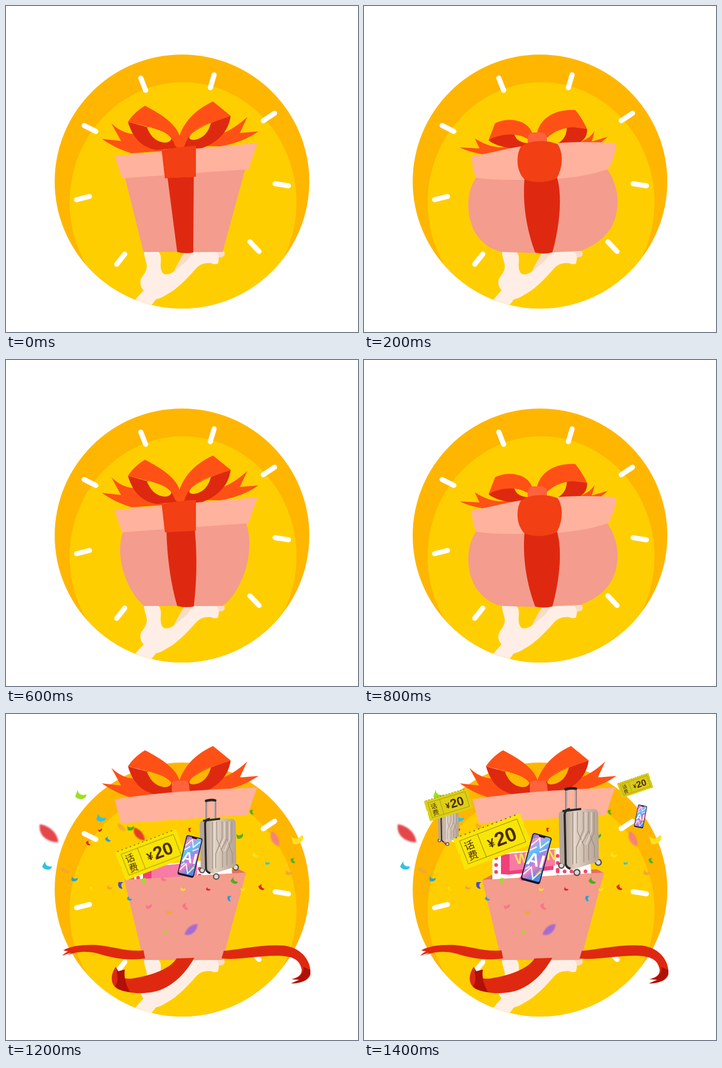
Recreate the animation shown at these times as an HTML page. Size 658 px wide and 611 px high, loop 1600 ms.

```html
<!DOCTYPE html>
<html lang="zh">
<head>
<meta charset="utf-8">
<title>Gift box</title>
<style>
  html, body { margin: 0; width: 100%; height: 100%; overflow: hidden; background: #fff; }
  svg { display: block; width: 100%; height: 100%; }
  .scene { opacity: 0; }
  .orange { fill: #ff5116; }
  .dark { fill: #de2910; }
  .knot { fill: #ff623c; }
  .band { fill: #f23f14; }
  .deep { fill: #b01008; }
  .lid { fill: #ffb29e; }
  .body { fill: #f49c8d; }
  .inside { fill: #e2705c; }
  .cjk { font-family: "Noto Sans CJK SC", "Noto Sans CJK", sans-serif; }
  .num { font-family: "Liberation Sans", Arial, sans-serif; font-weight: bold; }
  text { text-anchor: middle; }
</style>
</head>
<body>
<svg viewBox="0 0 658 611">
  <defs>
    <clipPath id="disc"><circle cx="329" cy="329" r="238"/></clipPath>
    <filter id="soft" x="-40%" y="-40%" width="180%" height="180%"><feGaussianBlur stdDeviation=".6"/></filter>
    <linearGradient id="shell">
      <stop offset="0" stop-color="#b8a696"/><stop offset=".3" stop-color="#e0d2c5"/>
      <stop offset=".65" stop-color="#c9b8a9"/><stop offset="1" stop-color="#b5a496"/>
    </linearGradient>
    <linearGradient id="screen" x2=".5" y2="1">
      <stop offset="0" stop-color="#7a6be0"/><stop offset=".22" stop-color="#e58fdc"/>
      <stop offset=".42" stop-color="#58c4f5"/><stop offset=".6" stop-color="#8f8cf0"/>
      <stop offset=".78" stop-color="#f07cc0"/><stop offset="1" stop-color="#4f8ce8"/>
    </linearGradient>

    <g id="loops">
      <path class="orange" d="M179 249L215 253L197 220C214 236 229 240 243 240L300 262L291 272L235 276C214 270 195 260 179 249Z"/>
      <path class="orange" d="M472 235L437 238L451 208C436 222 421 232 406 238L345 262L400 263C431 258 453 248 472 235Z"/>
      <path class="dark" fill-rule="evenodd" d="M228 217C236 245 252 265 282 270L322 266C317 245 290 228 264 227ZM263 226C269 243 280 255 297 256C305 256 310 251 309 247C302 238 287 231 263 226Z"/>
      <path class="orange" d="M260 187C290 203 322 222 326 250L324 268L316 262C311 244 296 231 264 226L228 217C236 205 247 194 260 187Z"/>
      <path class="dark" fill-rule="evenodd" d="M420 206C416 235 396 257 362 268L326 267C338 240 360 225 420 206ZM383 219C378 240 365 250 350 251C343 251 341 247 344 243C352 232 365 226 383 219Z"/>
      <path class="orange" d="M387 179L420 206L382 219C355 228 341 240 333 264L319 268C323 225 350 196 387 179Z"/>
    </g>
    <g id="top">
      <use href="#loops"/>
      <path class="knot" d="M310 250Q311 244 318 244H334Q341 244 342 250L344 270H310Z"/>
      <path class="lid" d="M203 279C270 268 350 261 469 257L452 308L215 324Z"/>
    </g>
    <g id="wrap">
      <use href="#loops"/>
      <path class="lid" d="M203 281L470 257L453 306L217 323Z"/>
      <path class="band" d="M291 270Q322 264 355 262V320L297 323Z"/>
    </g>

    <path id="chip" d="M-6 -5C-4 0 1 1 6 -3C9 3 -1 8 -6 4Z"/>
    <path id="flake" d="M-7 -4C-1 -5 5 -2 7 3C1 5 -6 3 -7 -4Z"/>

    <g id="ticket">
      <path fill="currentColor" d="M-67 -31H67V-9Q63 -5 67 0V31H-67V7Q-63 3 -67 -1Z"/>
      <path fill="none" stroke="#8a7600" stroke-width="2" stroke-dasharray="3 6" d="M-62 -31H62"/>
      <path fill="none" stroke="#8c7600" stroke-width=".9" d="M-57 -23H58V23H-57ZM-21 -23V23"/>
      <g fill="#4b2c0a">
        <text class="cjk" x="-43" y="-2" font-size="19" font-weight="500">话</text>
        <text class="cjk" x="-43" y="18" font-size="19" font-weight="500">费</text>
        <text class="num" x="-3" y="10" font-size="23">¥</text>
        <text class="num" x="26" y="13" font-size="37">20</text>
      </g>
    </g>

    <g id="phone">
      <rect x="-15.5" y="-38" width="31" height="76" rx="3.5" fill="#15152c"/>
      <rect x="-14" y="-36.5" width="28" height="71" rx="2.5" fill="url(#screen)"/>
      <path fill="none" stroke="#fff" stroke-width="2.2" opacity=".85" d="M-13 -18L-3 -32L2 -18L12 -31M-13 29L-4 15L3 32L12 18M-13 -10L-4 -18M2 -11L12 -18M-12 20L-7 14"/>
      <path fill="none" stroke="#ffb03c" stroke-width="2" d="M-12 -27L-7 -31M6 25L12 14"/>
      <path fill="#15152c" d="M-6 -37H6L4 -34H-4Z"/>
      <text class="num" y="12" font-size="28" fill="#fff">AI</text>
    </g>

    <g id="bag">
      <path fill="none" stroke="#b5b0ac" stroke-width="3" d="M379 142V182M395 142V180"/>
      <path fill="none" stroke="#444" stroke-width="1" d="M377 142V182M397 142V180"/>
      <path fill="none" stroke="#26262a" stroke-width="5" stroke-linecap="round" d="M377 141Q387 138 396 140"/>
      <g fill="#dcd8d5" stroke="#55504d" stroke-width="2.5">
        <circle cx="369" cy="284" r="5"/><circle cx="398" cy="297" r="5.5"/><circle cx="438" cy="278" r="5.5"/>
      </g>
      <path fill="#b5a598" d="M364 190Q364 182 371 181L384 178L383 287L366 278Z"/>
      <path fill="url(#shell)" d="M377 185Q378 178 386 177L430 178Q438 179 438 188L439 269Q439 275 433 278L392 291Q380 291 379 282Z"/>
      <path fill="none" stroke="#27272a" stroke-width="4" d="M385 178Q376 179 375 188L377 282Q379 288 386 290"/>
      <path fill="none" stroke="#a08f81" stroke-width="1.5" d="M390 184V282M399 183V220L411 247V278M410 183V218L397 250V280M420 183V219L409 240M430 184V222L420 246V274M420 219L431 249V270"/>
      <path fill="none" stroke="#f1e8de" stroke-width="1.2" d="M394 184V281M415 184V218L403 246M425 184V220L415 245"/>
      <path fill="#29292c" d="M371 180L406 176V180L371 184Z"/>
    </g>

    <g id="card">
      <path fill="#fff" d="M240 262L420 246L426 310H240Z"/>
      <path fill="none" stroke="#f0466e" stroke-width="7" stroke-linecap="round" stroke-dasharray="0 13" d="M247 270V306M362 266V306M362 295H420"/>
      <path fill="#f0407a" d="M256 264L354 254V292L270 301L256 300Z"/>
      <path fill="#f77ba5" d="M272 262L357 254V284L272 294Z"/>
    </g>
  </defs>

  <g clip-path="url(#disc)">
    <rect width="658" height="611" fill="#ffb600"/>
    <ellipse cx="331" cy="368" rx="212" ry="225" fill="#ffce00"/>
  </g>
  <path fill="none" stroke="#fff" stroke-width="9.5" stroke-linecap="round" d="M252 135L261 158M389 129L382 153M146 224L168 235M481 215L502 201M503 333L528 337M132 363L156 357M207 484L222 465M456 442L473 460"/>
  <g clip-path="url(#disc)">
    <path fill="#f8dcc8" d="M313 500C318 487 326 474 334 461L407 459C411 465 408 471 401 471L370 478Z"/>
    <path fill="#ffeee6" d="M258 461L284 460C292 466 289 478 289 487C290 499 293 503 300 503C313 502 322 490 333 482C342 475 344 468 350 462L393 461C400 466 398 477 396 483C390 485 387 483 383 482C372 481 363 484 356 491C340 509 320 531 300 541C291 547 284 549 280 550L268 566L230 565L242 550L257 533C249 524 250 513 255 507C260 500 264 494 263 485C262 478 258 470 258 461Z"/>
  </g>

  <g class="scene" data-steps="02">
    <path class="body" d="M222 320L257 461H405L447 306Z"/>
    <path class="dark" d="M302 322L351 320L350 462Q335 465 320 461Z"/>
    <use href="#wrap"/>
  </g>

  <g class="scene" data-steps="3">
    <path class="body" d="M220 320C202 360 222 430 258 461H405C445 430 466 355 449 306Z"/>
    <path class="dark" d="M300 321L353 319C358 370 356 420 351 462Q335 465 320 461C308 420 301 370 300 321Z"/>
    <use href="#wrap"/>
  </g>

  <g class="scene" data-steps="14">
    <path class="orange" d="M179 265L216 267L207 248C222 258 237 263 252 265L292 262L285 270L222 278C206 275 191 271 179 265Z"/>
    <path class="orange" d="M456 245L426 254L431 234C425 244 417 249 410 252L390 262H436Z"/>
    <path class="dark" d="M233 252C243 238 272 236 281 241C284 251 294 257 308 257L290 267C268 267 246 262 233 252Z"/>
    <path class="orange" d="M233 251L245 220C264 209 306 210 315 240L307 250C292 239 262 236 233 251Z"/>
    <path class="dark" d="M417 230C418 247 408 257 388 260H356C371 255 380 243 379 225Z"/>
    <path class="orange" d="M323 240C328 214 352 193 395 195C404 206 412 219 417 231C392 223 362 227 340 249Z"/>
    <path class="knot" d="M306 246Q307 238 315 237H333Q341 239 342 247V260H306Z"/>
    <path class="body" d="M212 319C191 343 189 392 208 425C222 448 246 461 262 461L320 463L405 459C443 444 472 420 474 370C475 344 465 320 455 306Z"/>
    <path class="lid" d="M201 282C240 275 265 267 295 263L362 257C400 254 436 255 470 257C471 275 465 292 456 306C425 317 392 321 361 324L300 326C265 326 235 326 210 322C204 310 202 295 201 282Z"/>
    <path class="dark" d="M300 324L361 322C372 360 364 420 352 462Q335 466 320 462C304 420 296 370 300 324Z"/>
    <path class="band" d="M293 264C310 250 345 251 362 259C373 275 372 303 360 323C340 332 318 332 300 325C284 309 284 280 293 264Z"/>
  </g>

  <g class="scene" data-steps="5">
    <path class="deep" d="M260 461C244 463 235 449 237 437C237 422 222 413 213 425L229 407C240 417 245 440 260 461ZM403 462C422 462 440 440 442 405L446 375L430 395C425 425 412 440 403 462Z"/>
    <path class="dark" d="M229 407C201 401 179 424 179 451C180 476 190 491 200 496C194 478 195 461 202 449C200 464 200 475 204 486C204 454 208 421 229 419L239 428Z"/>
    <path class="dark" d="M443 358C466 346 492 350 499 370C501 380 502 388 500 395C494 372 481 361 465 364C449 368 444 390 440 405L434 395Z"/>
    <path class="lid" d="M218 307L240 293L425 288L452 298L451 310L219 316Z"/>
    <path class="inside" d="M228 306L245 297L420 291L437 297Z"/>
    <path class="body" d="M218 311L451 299C455 355 440 425 404 461H260C222 420 214 360 218 311Z"/>
    <path class="lid" d="M218 306L452 297V301L218 312Z"/>
    <path class="dark" d="M315 384L338 353L358 383C357 410 355 438 352 462Q335 465 320 461C316 430 314 405 315 384Z"/>
    <path class="band" d="M316 333Q340 329 363 329C371 346 375 385 370 420C365 392 355 370 338 356C320 370 308 393 302 422C293 392 302 350 316 333Z"/>
    <g id="sparks"></g>
    <use href="#top" y="-30"/>
  </g>

  <g class="scene" data-steps="67">
    <use href="#top" y="-119"/>
    <path class="inside" d="M221 311L238 302L435 291L449 298Z"/>
  </g>
  <g class="scene" data-steps="6"><use href="#card" y="24"/></g>
  <g class="scene" data-steps="7">
    <use href="#card"/>
    <g class="num" fill="#ffe650" font-size="27">
      <text x="296" y="280" transform="rotate(-8 296 280)">W</text>
      <text x="320" y="277">A</text>
      <text x="351" y="274">N</text>
    </g>
  </g>
  <g class="scene" data-steps="67">
    <path class="body" d="M221 311L449 297L405 461H257Z"/>
    <path class="dark" d="M105 453C109 449 112 447 116 445L107 443C122 434 145 432 170 433C202 436 226 446 257 443L260 458C232 463 200 458 172 449C150 443 130 446 114 452L122 447Z"/>
    <path class="dark" d="M319 458C304 480 270 490 235 496C214 497 206 490 205 474C195 488 194 508 210 516C236 526 266 525 289 517C316 506 336 485 352 457Z"/>
    <path class="deep" d="M205 474L210 482L222 479C220 495 225 510 232 521C218 520 207 515 204 510C212 500 207 487 205 474Z"/>
    <path class="dark" d="M407 444C440 441 480 431 520 434C555 439 571 465 569 488C566 500 550 505 533 505L548 498L534 497C549 494 555 485 552 476C548 459 533 453 505 453C470 453 430 462 403 458Z"/>
    <path class="deep" d="M569 480C570 497 552 505 533 505L549 498L534 497C549 494 558 486 556 474Z"/>
    <g id="confetti"></g>
  </g>

  <g class="scene" data-steps="6" color="#f8e508">
    <use href="#ticket" transform="translate(271 264) rotate(-21) scale(.91)"/>
    <use href="#bag" transform="translate(393 312) scale(.91) translate(-398 -305)"/>
    <use href="#phone" transform="translate(344 267) rotate(13.5)"/>
  </g>

  <g class="scene" data-steps="7" color="#f8e508">
    <use href="#bag" transform="translate(156 248) scale(.52) translate(-398 -305)"/>
    <use href="#ticket" color="#dccf16" transform="translate(158 170) rotate(-17) scale(.63)"/>
    <use href="#ticket" color="#d8ca18" transform="translate(507 134) rotate(-19) scale(.46)"/>
    <use href="#phone" transform="translate(517 192) rotate(11) scale(.56)"/>
    <use href="#ticket" transform="translate(240 239) rotate(-21)"/>
    <use href="#bag"/>
    <use href="#phone" transform="translate(322 271) rotate(15) scale(1.2)"/>
  </g>
</svg>
<script>
  const STEP = 200, COUNT = 8;
  const tint = {
    r: '#e0282c', g: '#4fae1c', l: '#9be020', b: '#2b9fd8', c: '#2fc4e0',
    y: '#ffe020', o: '#f5a82c', p: '#f5788c', v: '#9a62dc', n: '#4a50c8'
  };

  const piece = (shape, x, y, color, size, turn, extra = '') =>
    `<use href="#${shape}" fill="${tint[color]}" ${extra} transform="translate(${x} ${y}) rotate(${turn}) scale(${size})"/>`;

  // x, y, colour, size, turn
  const chips = [
    [140, 152, 'l', 1.5, 20], [178, 195, 'c', 1.3, 20],
    [77, 285, 'c', 1.3, 30], [545, 234, 'y', 1.7, -15]
  ];
  const flakes = [
    [80, 225, 'r', 3.1, 18], [249, 226, 'r', 2, 25], [503, 235, 'p', 2, 40],
    [347, 404, 'v', 2, -65], [110, 294, 'o', 1.3, 0], [216, 213, 'o', 1.3, 20]
  ];
  const small = `176 217 r,191 235 b,233 213 g,154 242 r,128 309 b,160 327 y,194 325 o,
    215 321 n,231 346 b,267 360 p,299 408 l,305 371 o,336 361 p,331 328 y,259 313 l,
    378 328 r,418 346 b,427 313 g,443 328 y,478 325 r,489 279 c,537 275 g,529 297 o,
    460 184 g,467 264 y,344 217 r,295 309 p,437 228 g`;
  const sparks = '205 290 y,246 290 r,340 290 y,382 290 r,462 288 o,263 305 b,413 305 b';

  const scatter = (list, base, range) => list.split(',').map((item, i) => {
    const [x, y, color] = item.trim().split(' ');
    return piece('chip', x, y, color, base + range * ((i * 7) % 5) / 4, (i * 67) % 120 - 20);
  }).join('');

  document.getElementById('confetti').innerHTML =
    flakes.map(f => piece('flake', ...f, 'filter="url(#soft)" opacity=".85"')).join('') +
    chips.map(c => piece('chip', ...c)).join('') +
    scatter(small, .6, .4);
  document.getElementById('sparks').innerHTML = scatter(sparks, .5, .15);

  for (const scene of document.querySelectorAll('.scene')) {
    const shown = i => scene.dataset.steps.includes(i % COUNT) ? 1 : 0;
    const frames = Array.from({ length: COUNT + 1 }, (_, i) => ({
      offset: i / COUNT, opacity: shown(i), easing: 'steps(1, end)'
    }));
    scene.animate(frames, { duration: STEP * COUNT, iterations: Infinity });
  }
</script>
</body>
</html>
```
